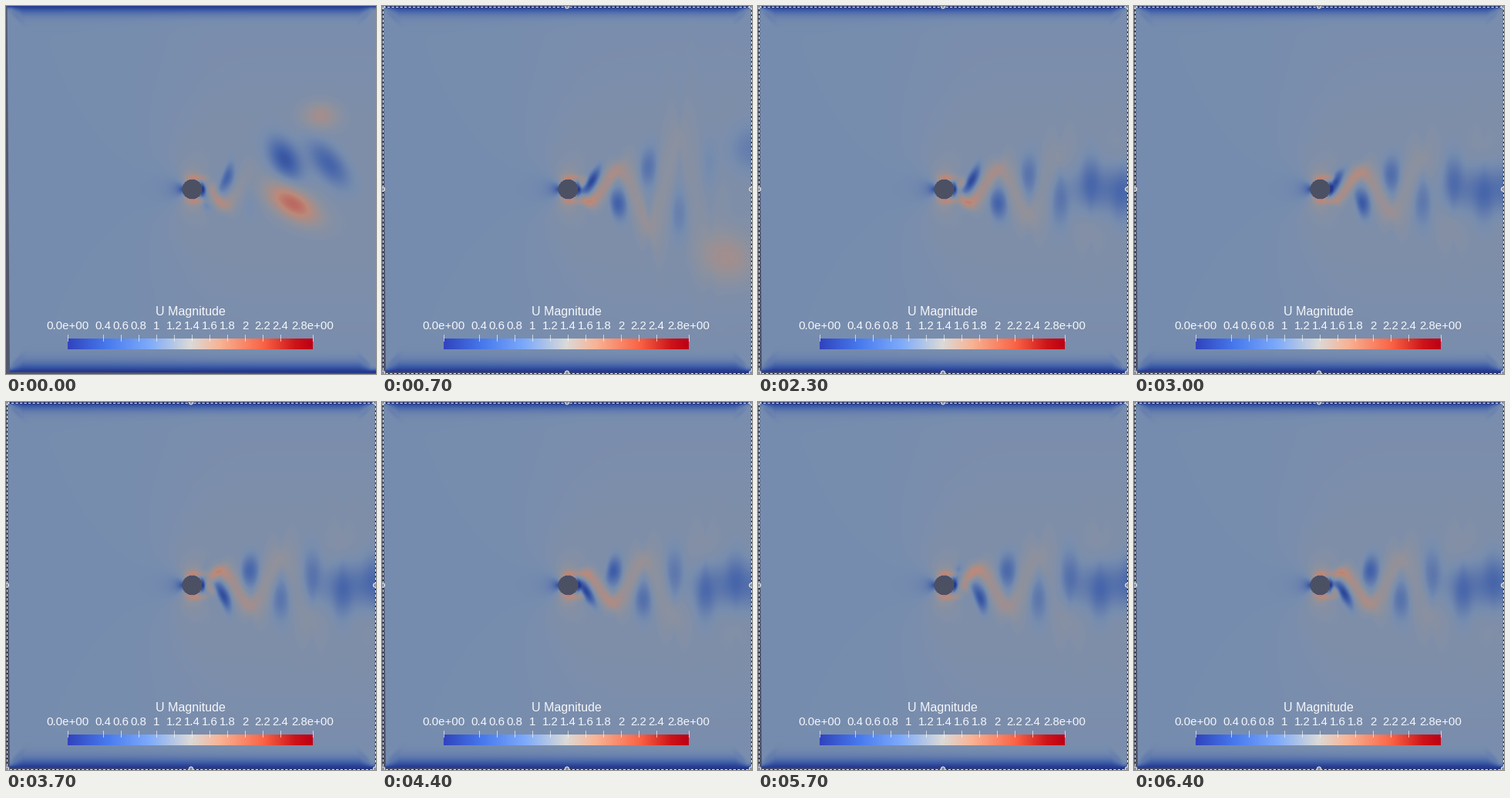
These frames come from a looping animation (480 by 477 pixels, 6500 ms). A matplotlib script:

```python
import numpy as np
import matplotlib.pyplot as plt
from matplotlib.animation import FuncAnimation
from matplotlib.colors import LinearSegmentedColormap
from matplotlib.patches import Circle, Polygon

W, H, DPI = 480, 477, 64
PT = 72 / DPI                      # points per pixel
FRAMES, STEP = 65, 100
CX, CY, R = 241.5, 237.5, 12.8     # cylinder
WAVE, FREQ = 80.0, 0.2545          # wake wavelength (px), cycles per frame
K = 2 * np.pi / WAVE
U_MAX = 2.8
GREY = "#52576e"


def color_map(*stops):
    return LinearSegmentedColormap.from_list("", stops, N=512)


FIELD = color_map((0, "#21348c"), (.18, "#4362aa"), (.357, "#778daf"),
                  (.48, "#8e929e"), (.68, "#bc8a7a"), (1, "#b93c3e"))
BAR = color_map((0, "#3044be"), (.16, "#487aee"), (.33, "#7daafa"),
                (.5, "#dadad8"), (.62, "#f8b496"), (.8, "#fa6446"),
                (.93, "#cd1419"), (1, "#be0014"))

x, y = np.meshgrid(np.arange(W) + .5, np.arange(H) + .5)
eta = y - CY
side = np.abs(eta)


def step(v):
    return 1 / (1 + np.exp(-np.clip(v, -40, 40)))


def gauss(v):
    return np.exp(-v * v)


def still_field():
    z = (x - CX) + 1j * eta
    r = np.abs(z)
    z = np.where(r < R, R, z)
    u = 1 + .85 * (np.abs(1 - R ** 2 / z ** 2) - 1)
    u += .1 * step((x - 230) / 25) * gauss(eta / 150) + .04 * step((x - 215) / 40)
    u += .4 * gauss((side - 15) / 4) * gauss((x - 250) / 12)
    return u - .6 * gauss((r - R - 1) / 3) * step((x - CX - 8) / 3)


def wall_factor():
    edge = np.minimum(x, W - x)
    wall = np.minimum(y, 474 - y).clip(0)
    depth = np.where(y < CY, 9, 11) * np.clip(edge / 22, .3, 1)
    keep = 1 - .95 * np.exp(-(wall / depth) ** 1.4)
    along, off = (edge + wall) / 2, (edge - wall) / 1.5
    return keep - .12 * gauss(off / 3) * gauss((along - 13) / 9)


BASE, WALL = still_field(), wall_factor()

# shape of the travelling wake, growing and fading downstream
past = np.clip(x - 275, 0, None)
lean = .57 * step((288 - x) / 7) * eta
near = step((282 - x) / 5)
born = step((x - 257) / 2)
rise = np.clip(23 + .2 * (x - 303), 15, 50)
offset = 19 - 9 * near
spread = np.clip(13 + .17 * (x - 272), 13, 32)
hot = .95 * step((x - 260) / 3) * np.exp(-past / 65)
cold = .85 * born * np.exp(-past / 100)
ridge_w = np.clip(7 + .09 * (x - 260), 6, 20)
tail = -.5 * step((x - 402) / 14) * gauss(eta / 32)


def wake(n):
    turn = 2 * np.pi * FREQ * (n - 23)
    # the first vortices swing wider than the settled street
    swell = 1 + .7 * step((11 - n) / 1.5) * step((x - 335) / 8)
    a = rise * swell
    c, s = np.cos(K * (x - 312) - turn), np.sin(K * (x - 312) - turn)
    ridge = gauss((eta + a * c) / np.sqrt(1 + (a * K * s) ** 2) / ridge_w)
    u = hot * ridge * (.72 + .28 * c * c)
    for sign in (1, -1):
        th = K * (x - sign * lean - 312) - turn
        band = gauss((sign * eta - offset * swell) / spread)
        u -= cold * band * np.clip(sign * np.cos(th), 0, 1) ** (2 + 3 * near)
        # bright curl rolling up just behind each dark streak
        curl = np.clip(sign * np.cos(th + .9), 0, 1) ** 5
        u += .8 * born * step((270 - x) / 3) * curl * gauss((sign * eta - 7) / 8)
    return u


# x, y, vx, vy, long radius, tilt in degrees, strength
DRIFT = [(408, 142, 18, -1, 24, 0, .5), (362, 199, 17, -2, 30, 58, -.75),
         (419, 205, 17, -2, 36, 50, -.6), (372, 256, 11, 10, 36, 32, 1.15)]


def drifter(n, px, py, vx, vy, size, tilt, amp):
    z = (x - px - vx * n) + 1j * (y - py - vy * n)
    z = z * np.exp(-1j * np.radians(tilt))
    return amp * np.exp(-n / 8) * gauss(z.real / size) * gauss(z.imag / (18 + 2 * n))


def speed(n):
    u = BASE + wake(n) * step((300 + 20 * n - x) / 12)
    u = u + tail * step((n - 11.5) * 1.5)
    if n < 15:
        u = u + sum(drifter(n, *d) for d in DRIFT)
    return np.clip(u, .03, 2.7) * WALL


fig = plt.figure(figsize=(W / DPI, H / DPI), dpi=DPI, facecolor=GREY)
ax = fig.add_axes([0, 0, 1, 1])
ax.axis("off")
field = ax.imshow(speed(0), cmap=FIELD, vmin=0, vmax=U_MAX, aspect="auto",
                  extent=(0, W, H, 0), interpolation="nearest")
ax.imshow(np.linspace(0, 1, 318)[None], cmap=BAR, aspect="auto",
          extent=(80, 398, 445.5, 432), interpolation="nearest")
ax.set_xlim(0, W)
ax.set_ylim(H, 0)


def patch(points, color):
    ax.add_patch(Polygon(points, fc=color, lw=0))


# view background showing around the slightly turned domain
patch([(0, 0), (1.5, 0), (5, H), (0, H)], GREY)
patch([(0, 474.5), (W, 476), (W, H), (0, H)], GREY)
ang = np.arange(16) * np.pi / 8 + np.pi / 16
patch(np.c_[CX + 13.2 * np.cos(ang), CY + 12.6 * np.sin(ang)], "#4c5063")


def label(tx, ty, text, size):
    ax.text(tx, ty, text, color="#f4f6fa", family="Liberation Sans",
            size=size * PT, ha="center", va="baseline")


def tick(tx, text):
    label(tx, 419, text, 15)
    ax.plot([tx, tx], [426, 434], color="white", lw=.8 * PT, alpha=.8)


label(239, 401.5, "U Magnitude", 16)
tick(80, "0.0e+00")
tick(398, "2.8e+00")
for i in range(2, 13):
    tick(80 + 23 * i, f"{.2 * i:.2g}")

# selection outline with handles
left, mid, right, top, bottom = 1, 240, 479, .5, 475.5
bx, by = [left, right, right, left, left], [top, top, bottom, bottom, top]
outline = ax.plot(bx, by, color="#202228", lw=1.3 * PT)
outline += ax.plot(bx, by, color="#e4e4e4", lw=1.1 * PT, dashes=(3, 2))
for hx in (left, mid, right):
    for hy in (top, CY, bottom):
        if (hx, hy) != (mid, CY):
            outline.append(ax.add_patch(Circle(
                (hx, hy), 2.6, fc="#8c919c", ec="#eeeeee", lw=PT, zorder=4)))


def draw(n):
    field.set_data(speed(n))
    for part in outline:
        part.set_visible(n > 0)
    return [field, *outline]


anim = FuncAnimation(fig, draw, frames=FRAMES, interval=STEP, repeat=True,
                     repeat_delay=0, blit=False)
plt.show()
```
